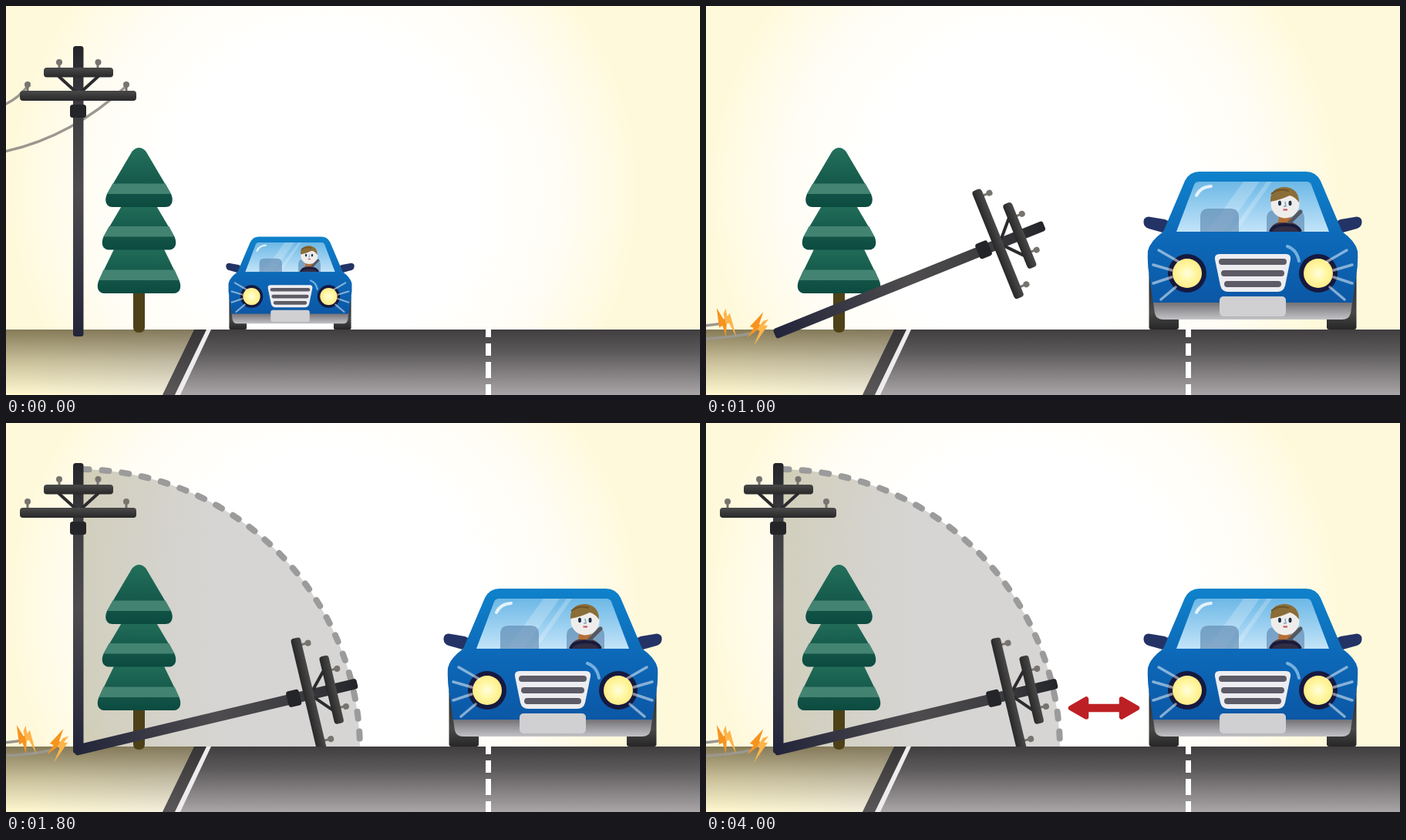
An HTML page for the animation above (6000 ms loop, 900 by 505 pixels).

```html
<!DOCTYPE html>
<html lang="en">
<head>
<meta charset="utf-8">
<title>Falling utility pole</title>
<style>
  html, body { margin: 0; width: 100%; height: 100%; overflow: hidden; }
  svg { display: block; width: 100vw; height: 100vh; }
</style>
</head>
<body>
<svg viewBox="0 0 900 505">
  <defs>
    <radialGradient id="sky" gradientUnits="userSpaceOnUse" cx="413" cy="240" r="405">
      <stop offset=".5" stop-color="#fff"/><stop offset=".78" stop-color="#fffdf3"/><stop offset="1" stop-color="#fff9dc"/>
    </radialGradient>
    <linearGradient id="sand"><stop offset=".1" stop-color="#fff8d0"/><stop offset="1" stop-color="#f3eee0"/></linearGradient>
    <linearGradient id="shade" x2="0" y2="1">
      <stop stop-color="#5d512f" stop-opacity=".75"/><stop offset=".5" stop-color="#5d512f" stop-opacity=".33"/><stop offset="1" stop-color="#5d512f" stop-opacity="0"/>
    </linearGradient>
    <linearGradient id="road" x2="0" y2="1"><stop stop-color="#403e3f"/><stop offset=".35" stop-color="#5d5a5b"/><stop offset="1" stop-color="#aaa6a7"/></linearGradient>
    <linearGradient id="kerb" x2="0" y2="1"><stop stop-color="#363435"/><stop offset="1" stop-color="#5b5859"/></linearGradient>
    <linearGradient id="leaf" x2="0" y2="1"><stop stop-color="#23705b"/><stop offset="1" stop-color="#0c4a40"/></linearGradient>
    <linearGradient id="mast" x2="0" y2="1">
      <stop stop-color="#24252a"/><stop offset=".2" stop-color="#3c3c40"/><stop offset=".5" stop-color="#4e4c4e"/><stop offset="1" stop-color="#22243a"/>
    </linearGradient>
    <linearGradient id="arm" x2="0" y2="1"><stop stop-color="#4a4a4a"/><stop offset="1" stop-color="#282829"/></linearGradient>
    <linearGradient id="reach"><stop stop-color="#66633f"/><stop offset=".5" stop-color="#78736e"/></linearGradient>
    <linearGradient id="paint" x2="0" y2="1"><stop stop-color="#0f82cb"/><stop offset=".5" stop-color="#0d69b8"/><stop offset="1" stop-color="#0b57a5"/></linearGradient>
    <linearGradient id="glass" x2="0" y2="1"><stop stop-color="#6db8e6"/><stop offset="1" stop-color="#c2e4f9"/></linearGradient>
    <linearGradient id="chrome" x2="0" y2="1"><stop stop-color="#737277"/><stop offset="1" stop-color="#c3c2c5"/></linearGradient>
    <linearGradient id="tyre" x2="0" y2="1"><stop stop-color="#252525"/><stop offset=".7" stop-color="#484848"/><stop offset="1" stop-color="#262626"/></linearGradient>
    <radialGradient id="lamp"><stop stop-color="#fffde0"/><stop offset=".5" stop-color="#fff8a8"/><stop offset="1" stop-color="#ffec86"/></radialGradient>
    <linearGradient id="haze" gradientUnits="userSpaceOnUse" x1="430" y1="420" x2="500" y2="212">
      <stop stop-color="#444" stop-opacity=".5"/><stop offset=".6" stop-color="#777" stop-opacity=".28"/><stop offset="1" stop-color="#999" stop-opacity="0"/>
    </linearGradient>
    <clipPath id="aboveRoad"><path d="M-50-50H950V420H240V505H-50Z"/></clipPath>

    <g id="pole">
      <rect x="87" y="52" width="13.500" height="377" rx="3.500" fill="url(#mast)"/>
      <path d="M68 91L90 111M120 91L98 111" stroke="#2b2b2e" stroke-width="4"/>
      <path d="M69 74V82M119 74V82M28 103V112M156 103V112" stroke="#77746f" stroke-width="3"/>
      <g fill="#77746f"><circle cx="69" cy="73" r="4"/><circle cx="119.500" cy="73" r="4"/><circle cx="28" cy="102" r="4"/><circle cx="156" cy="102" r="4"/></g>
      <rect x="49" y="80" width="90" height="12.500" rx="4" fill="url(#arm)"/>
      <rect x="18" y="110" width="151" height="13" rx="4" fill="url(#arm)"/>
      <rect x="83" y="128" width="21" height="17" rx="3.500" fill="#242529"/>
    </g>
    <g id="bolt">
      <path d="M-1-22L-10 2H-5L-8 17L5-5H0Z" fill="#f7931e"/>
      <path d="M3-11L0 2L4 3L4 23L11-8L6-6L9-16Z" fill="#fdb44b"/>
    </g>
    <g id="carSide">
      <rect x="574.500" y="345" width="38.500" height="75" rx="3" fill="url(#tyre)"/>
      <path d="M574 273.500Q567 274 567.500 281Q568 287 574 289L592 294L602 285Q601 279 595 277Z" fill="#243366"/>
    </g>
    <g id="headlight">
      <circle cx="624" cy="347" r="25" fill="#16193f"/>
      <circle cx="624" cy="347" r="19" fill="url(#lamp)"/>
      <path d="M587 317L613 332M580 336L604 343M580 360L604 352M590 381L609 365"
        stroke="#fff" stroke-width="3.500" stroke-linecap="round" opacity=".5"/>
    </g>
  </defs>

  <rect width="900" height="505" fill="url(#sky)"/>
  <rect y="420" width="900" height="85" fill="url(#road)"/>
  <path d="M0 420H244L203 505H0Z" fill="url(#sand)"/>
  <path d="M0 420H244L203 505H0Z" fill="url(#shade)"/>
  <path d="M244 420H260L219 505H203Z" fill="url(#kerb)"/>
  <path d="M260 420H266L226 505H219Z" fill="#eeecec"/>
  <path d="M625.500 420V430M625.500 438V454M625.500 462V483M625.500 491V505" stroke="#fff" stroke-width="7"/>

  <g id="ghost">
    <path d="M94 420V60A365 365 0 0 1 459 420Z" fill="url(#reach)" opacity=".3"/>
    <path d="M94 60A365 365 0 0 1 459 420" fill="none" stroke="#9b9b9b" stroke-width="8" stroke-linecap="round"
      stroke-dasharray="9 16.900" stroke-dashoffset="-4.700"/>
    <use href="#pole"/>
  </g>
  <g id="smoke" fill="none" stroke="url(#haze)" stroke-width="25">
    <path d="M430 418C420 350 472 340 456 300C446 262 460 246 492 236"/>
    <path d="M436 347C490 350 502 312 490 278C478 240 500 222 534 214"/>
    <path d="M425 420V350"/>
  </g>
  <g id="cables" fill="none" stroke="#9b978f" stroke-width="3.500"><path/><path/></g>
  <g id="tree">
    <path d="M165 370H180V417Q180 424 172.500 424Q165 424 165 417Z" fill="#4d4118"/>
  </g>
  <g clip-path="url(#aboveRoad)"><use id="falling" href="#pole"/></g>
  <g id="bolts"><use href="#bolt"/><use href="#bolt"/></g>

  <g id="car">
    <use href="#carSide"/><use href="#carSide" transform="matrix(-1 0 0 1 1418 0)"/>
    <path d="M640 215H778Q791 215 797 227L825 293Q842 305 845 318Q846 335 843 352L838 388H580L575 352Q572 335 573 318Q576 305 593 293L621 227Q627 215 640 215Z" fill="url(#paint)"/>
    <path d="M639 228H779Q783 228 785 232L808 293H610L633 232Q635 228 639 228Z" fill="url(#glass)"/>
    <path d="M697 228H718L672 293H650ZM727 228H734L688 293H681Z" fill="#fff" opacity=".22"/>
    <path d="M636 246Q641 235 655 234" fill="none" stroke="#fff" stroke-width="4" stroke-linecap="round" opacity=".8"/>
    <path d="M641 293V274Q641 263 652 263H680Q691 263 691 274V293ZM727 293V276Q727 265 738 265H765Q776 265 776 276V293Z" fill="#5f87b0" opacity=".65"/>
    <path d="M731 293Q733 280 751 280Q769 280 771 293Z" fill="#513c40"/>
    <path d="M743 273H758L759 281H742Z" fill="#b56f35"/>
    <circle cx="751" cy="257" r="18.500" fill="#efedeb"/>
    <path d="M732 254Q731 236 750 235Q769 236 769 255Q763 247 757 246Q744 252 732 254Z" fill="#8a6d38"/>
    <path d="M733 244Q742 236 756 240" fill="none" stroke="#6f5426" stroke-width="2"/>
    <g fill="#20324b"><ellipse cx="744" cy="256" rx="2" ry="3.200"/><ellipse cx="757.500" cy="256" rx="2" ry="3.200"/></g>
    <path d="M751 254L752 260H749" fill="none" stroke="#7aa7c5" stroke-width="1.500"/>
    <path d="M748.500 264.500H754" stroke="#c34b55" stroke-width="2"/>
    <path d="M754 284L771 267" stroke="#56575f" stroke-width="5" stroke-linecap="round"/>
    <path d="M732 293Q735 284 752 284Q768 284 771 293" fill="#302d45" stroke="#191a3b" stroke-width="4"/>
    <path d="M600 293H818V297H600Z" fill="#0d6aba"/>
    <path d="M754 312Q766 316 769 331" fill="none" stroke="#9fd0f2" stroke-width="4" stroke-linecap="round" opacity=".7"/>
    <use href="#headlight"/><use href="#headlight" transform="matrix(-1 0 0 1 1418 0)"/>
    <path d="M580 385H838L836 399Q834 407 825 407H593Q584 407 582 399Z" fill="url(#chrome)"/>
    <path d="M666 322H752Q759 322 758 329L751 363Q749 371 741 371H677Q669 371 667 363L660 329Q659 322 666 322Z" fill="#ededf1"/>
    <path d="M669 332H749M672 347H746M676 361H742" stroke="#5d5b66" stroke-width="8" stroke-linecap="round"/>
    <rect x="666" y="377" width="86" height="26" rx="5" fill="#d0d0d2"/>
  </g>
  <path id="arrow" d="M473 370L493 358.500V368H539V358.500L559 370L539 381.500V372H493V381.500Z" fill="#bd2024" stroke="#bd2024" stroke-width="6.500" stroke-linejoin="round"/>
</svg>
<script>
const STEP = 200, LOOP = 6000;
const $ = id => document.getElementById(id);

// Each tier: half width and y of its top, half width and y of its base.
function addTier(topHalf, top, baseHalf, base) {
  const x = 172.500, strip = base - 30.500, side = base - 17;
  const half = y => topHalf + (baseHalf - 2 - topHalf) * (y - top) / (side - top);
  const shoulder = top + Math.min(8, topHalf) * .6;
  $('tree').insertAdjacentHTML('beforeend', `
    <path d="M${x - topHalf} ${shoulder}Q${x - topHalf + 4} ${top} ${x} ${top}Q${x + topHalf - 4} ${top} ${x + topHalf} ${shoulder}
      L${x + baseHalf - 2} ${side}C${x + baseHalf + 2} ${base - 8} ${x + baseHalf - 1} ${base} ${x + baseHalf - 9} ${base}H${x - baseHalf + 9}
      C${x - baseHalf + 1} ${base} ${x - baseHalf - 2} ${base - 8} ${x - baseHalf + 2} ${side}Z" fill="url(#leaf)"/>
    <path d="M${x - half(strip)} ${strip}H${x + half(strip)}L${x + half(side)} ${side}H${x - half(side)}Z" fill="#438371"/>`);
}
addTier(31, 308, 54, 373);
addTier(22, 254, 48, 316.500);
addTier(9, 184, 43.500, 261);

// Car: centre, width. Cable: start y, control point, end point. Bolt: centre, angle.
const poses = [
  { step: 0, angle: 0, car: [368.500, 167],
    cables: [[128, 16, 120, 28, 104], [189, 85, 170, 156, 104]], bolts: [[28, 100, 0], [156, 102, -60]] },
  { step: 2, angle: 19.800, car: [500, 208],
    cables: [[133, 50, 118, 90, 94], [208, 75, 198, 146, 163]], bolts: [[95, 91, 0], [153, 156, -65]] },
  { step: 4, angle: 48.500, car: [631, 256],
    cables: [[328, 30, 334, 66, 338], [378, 36, 390, 74, 394]], bolts: [[73, 340, 22], [83, 392, -20]] },
  { step: 5, angle: 68, car: [709, 284],
    cables: [[415, 15, 413, 22, 412], [432, 30, 431, 58, 425]], bolts: [[25, 411, -28], [67, 418, 22]] },
];
poses.push({ ...poses[3], step: 6, angle: 76.600 });

const mix = (a, b, k) => Array.isArray(a) ? a.map((v, i) => mix(v, b[i], k)) : a + (b - a) * k;

function draw(now) {
  const t = now % LOOP, step = Math.floor(t / STEP), at = Math.min(step, 6);
  const next = Math.max(1, poses.findIndex(p => p.step >= at));
  const a = poses[next - 1], b = poses[next], k = (at - a.step) / (b.step - a.step);
  const get = key => mix(a[key], b[key], k);

  $('falling').setAttribute('transform', `rotate(${get('angle')} 93.500 424)`);
  const [x, width] = get('car');
  $('car').setAttribute('transform', `translate(${x} 420) scale(${width / 284}) translate(-709 -420)`);
  get('cables').forEach(([y, cx, cy, ex, ey], i) =>
    $('cables').children[i].setAttribute('d', `M-2 ${y}Q${cx} ${cy} ${ex} ${ey}`));
  get('bolts').forEach(([bx, by, turn], i) =>
    $('bolts').children[i].setAttribute('transform', `translate(${bx} ${by}) rotate(${turn})`));

  $('bolts').style.opacity = step ? 1 : 0;
  $('ghost').style.opacity = Math.min(1, Math.max(0, (step - 6) / 3));
  $('smoke').style.opacity = { 6: .6, 7: 1, 8: .5 }[step] || 0;
  const arrowOn = t >= 4000 || t >= 2000 && Math.floor(t / 500) % 2 === 0;
  $('arrow').style.opacity = arrowOn ? 1 : 0;
}

const start = performance.now();
function tick() {
  draw(performance.now() - start);
  requestAnimationFrame(tick);
}
tick();
</script>
</body>
</html>
```
